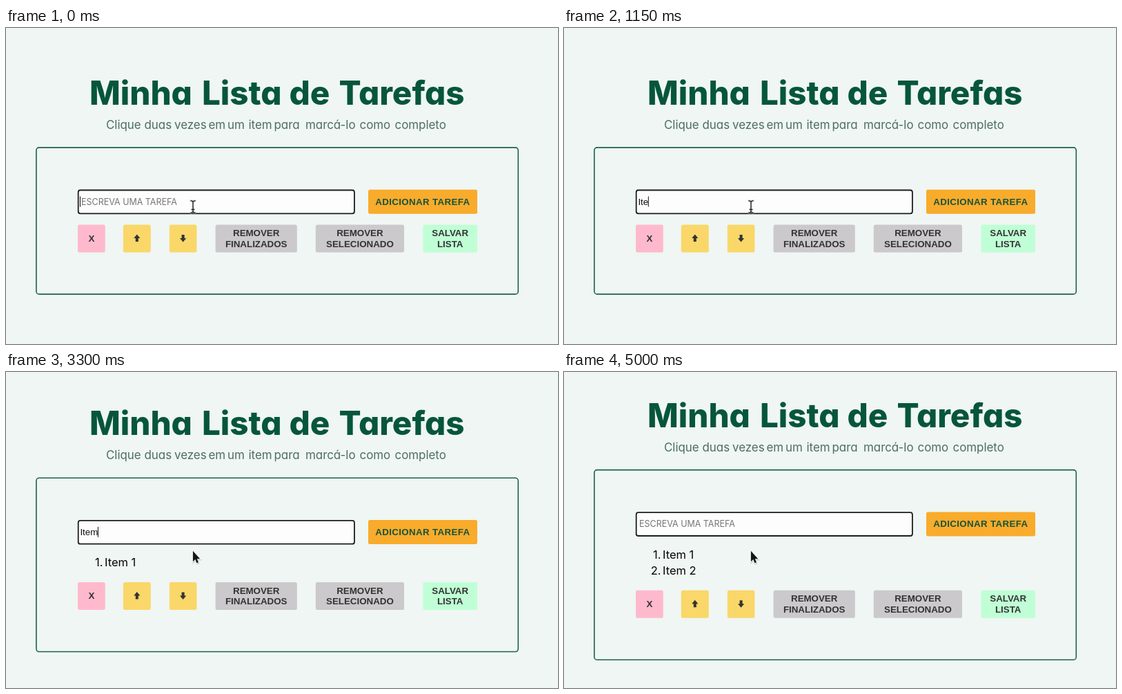
These frames come from a looping animation (800x457 px, 5030 ms). An HTML page:

```html
<!DOCTYPE html>
<html lang="pt-BR">
<head>
<meta charset="utf-8">
<title>Minha Lista de Tarefas</title>
<style>
  html, body { margin: 0; width: 100%; height: 100%; overflow: hidden; background: #eff6f3; }
  svg { display: block; width: 100%; height: 100%; }
  text { white-space: pre; }
  .round { font-family: Inter, sans-serif; font-feature-settings: "cv11"; font-optical-sizing: none; }
  .title { font-size: 47.5px; font-weight: 800; fill: #06563b; }
  .sub { font-size: 16.9px; fill: #4d6e61; }
  .hint { font-size: 12.5px; fill: #757578; }
  .item { font-size: 16.5px; fill: #050505; }
  .typed { font: 13.33px "Liberation Sans", Arial, sans-serif; fill: #111; }
  .label { font: bold 13.33px "Liberation Sans", Arial, sans-serif; fill: #333; text-anchor: middle; }
  .add { fill: #17533a; letter-spacing: .35px; }
</style>
</head>
<body>
<svg id="stage" viewBox="0 0 800 457"></svg>
<script>
const LOOP = 5030;
const stage = document.getElementById("stage");

function add(parent, tag, attrs, content = "") {
  const node = document.createElementNS("http://www.w3.org/2000/svg", tag);
  for (const key in attrs) node.setAttribute(key, attrs[key]);
  node.textContent = content;
  parent.append(node);
  return node;
}
const box = (parent, x, y, width, height, fill, extra) =>
  add(parent, "rect", { x, y, width, height, fill, rx: 2.5, ...extra });
const write = (parent, cls, x, y, content) =>
  add(parent, "text", { class: cls, x, y }, content);
const words = (parent, cls, y, list) =>
  list.forEach(([word, x]) => write(parent, cls, x, y, word));
const show = (node, on) => node.setAttribute("visibility", on ? "visible" : "hidden");

const panel = box(stage, 43.9, 172.9, 698.4, 212, "none", { rx: 4, stroke: "#1b6349", "stroke-width": 1.6 });
const upper = add(stage, "g", {});
const lower = add(stage, "g", {});

words(upper, "round title", 111, [["Minha", 121], ["Lista", 284], ["de", 410.5], ["Tarefas", 482.5]]);
words(upper, "round sub", 146, [
  ["Clique", 145], ["duas", 200.5], ["vezes", 244], ["em", 293.5], ["um", 321], ["item", 351.5],
  ["para", 388.5], ["marcá-lo", 434], ["como", 512.5], ["completo", 563.5]
]);

box(upper, 104.7, 234.5, 400.2, 33.8, "#fdfdfe", { rx: 3, stroke: "#1c1c1e", "stroke-width": 1.8 });
const hint = write(upper, "round hint", 109, 255.5, "ESCREVA UMA TAREFA");
const typed = write(upper, "typed", 107.4, 255.5, "");
const caret = box(upper, 107, 243.5, 1, 15, "#111", { rx: 0 });
box(upper, 525, 233.7, 158, 35, "#f9ab2b");
write(upper, "label add", 603.8, 255.6, "ADICIONAR TAREFA");

// Each list row is centred on the growing panel.
const rows = ["1", "2"].map((n, i) => {
  const row = add(stage, "g", {});
  add(row, "text", { class: "round item", x: 140.5, y: i * 23.6, "text-anchor": "end" }, n + ".");
  write(row, "round item", 143, i * 23.6, "Item " + n);
  return row;
});

const BUTTONS = [
  [104, 39.7, "#ffb9cd", ["X"]],
  [169.8, 40, "#fad769", "up"],
  [236.8, 39.6, "#fad769", "down"],
  [303.6, 118.2, "#cbc9cb", ["REMOVER", "FINALIZADOS"]],
  [448.8, 128.2, "#cbc9cb", ["REMOVER", "SELECIONADO"]],
  [604.4, 78.6, "#c0ffd6", ["SALVAR", "LISTA"]]
];
for (const [x, w, color, label] of BUTTONS) {
  const mid = x + w / 2;
  box(lower, x, 284.5, w, 40, color);
  if (typeof label === "string") {
    add(lower, "path", {
      d: "M0-5.5 4.6 0H2V5H-2V0H-4.6Z", fill: "#333",
      transform: `translate(${mid} 304) scale(1 ${label === "up" ? 1 : -1})`
    });
  } else {
    label.forEach((line, i) =>
      write(lower, "label", mid, label.length === 1 ? 308.7 : 301 + 15.8 * i, line));
  }
}

const beam = add(stage, "g", { fill: "none", "stroke-linecap": "round" });
const beamPath = "M267.8 249.8Q271 249.8 271 252V265Q271 267.2 267.8 267.2M274.2 249.8Q271 249.8 271 252M271 265Q271 267.2 274.2 267.2M269.3 262.5H272.7";
add(beam, "path", { d: beamPath, stroke: "#b9b9bd", "stroke-width": 3, opacity: .65 });
add(beam, "path", { d: beamPath, stroke: "#29292b", "stroke-width": 1.3 });

const arrow = add(stage, "g", {});
const arrowPath = "M270.9 258.8V274.2L274.3 271.1 276.4 276.3 279 275.2 276.8 270.2H281.2Z";
add(arrow, "path", { d: arrowPath, fill: "#777", opacity: .3, transform: "translate(.5 1.2)", stroke: "#777", "stroke-width": 2 });
add(arrow, "path", { d: arrowPath, fill: "#151515", stroke: "#fff", "stroke-width": 1.4, "paint-order": "stroke" });

// Key press times: six characters, then Enter.
const ENTRIES = [
  { text: "Item 1", keys: [820, 970, 1110, 1270, 1620, 1960, 2100] },
  { text: "Item 2", keys: [2600, 3000, 3120, 3280, 3440, 3650, 4300] }
];
const ALL_KEYS = ENTRIES.flatMap(entry => entry.keys);
const SHIFTS = [0, 19.6, 31.3];

function draw(t) {
  const done = ENTRIES.filter(entry => t >= entry.keys[6]).length;
  const entry = ENTRIES[done];
  const text = entry ? entry.text.slice(0, entry.keys.filter(key => t >= key).length) : "";
  const shift = SHIFTS[done];

  upper.setAttribute("transform", `translate(0 ${-shift})`);
  lower.setAttribute("transform", `translate(0 ${shift})`);
  panel.setAttribute("y", 172.9 - shift);
  panel.setAttribute("height", 212 + 2 * shift);

  rows.forEach((row, i) => {
    show(row, i < done);
    row.setAttribute("transform", `translate(0 ${300.9 - shift})`);
  });

  typed.textContent = text;
  show(hint, !text);
  const lastKey = ALL_KEYS.filter(key => t >= key).pop() ?? -200;
  show(caret, (t - lastKey) % 1000 < 500);
  caret.setAttribute("x", 107 + (text ? typed.getComputedTextLength() : 0));

  show(beam, done === 0);
  show(arrow, done > 0);
}

let start;
function tick(now) {
  start ??= now;
  draw((now - start) % LOOP);
  requestAnimationFrame(tick);
}
draw(0);
requestAnimationFrame(tick);
</script>
</body>
</html>
```
